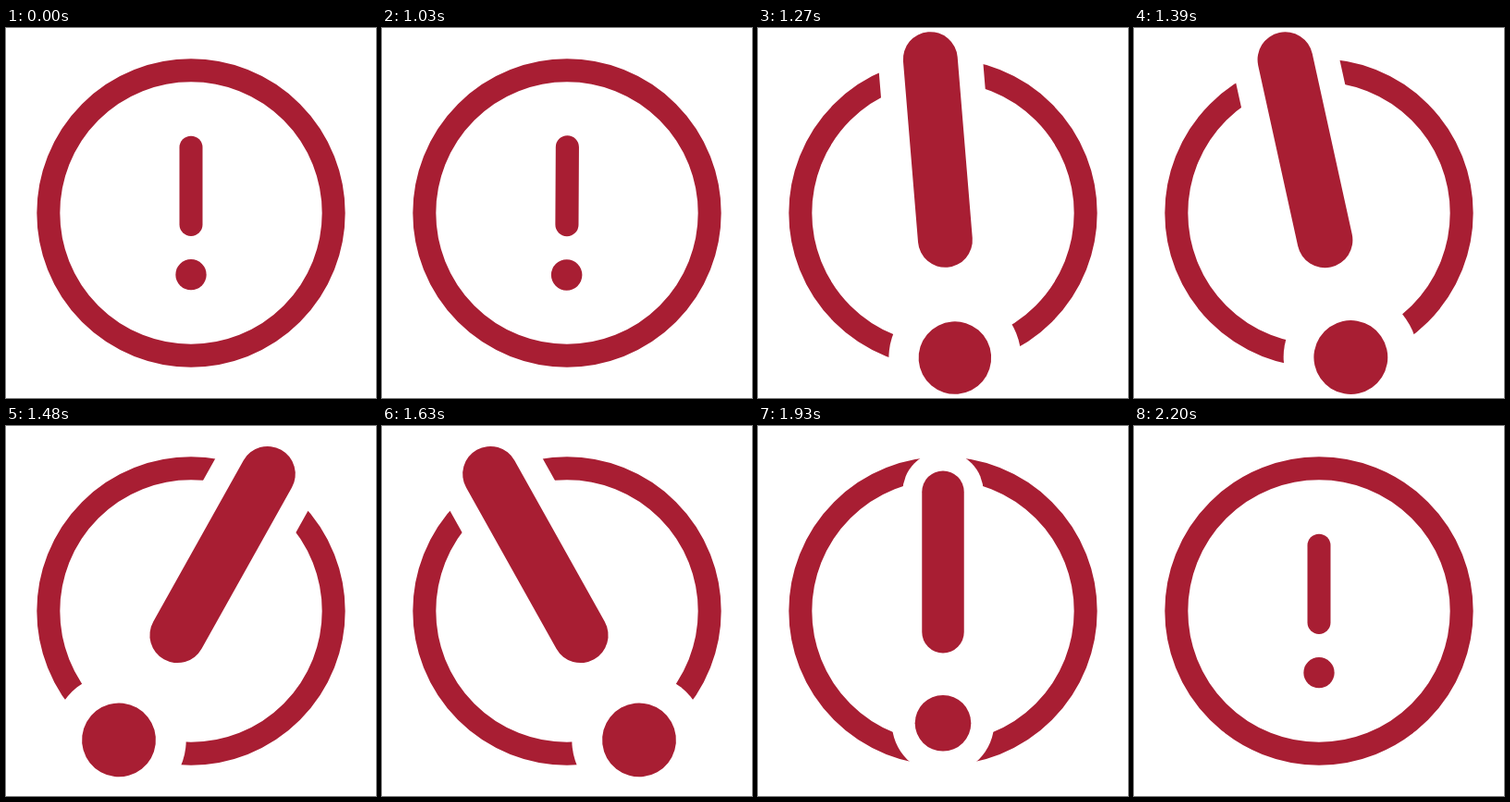
An HTML page that plays this animation: 400 by 400 pixels, repeating every 2230 ms.

```html
<!DOCTYPE html>
<html lang="en">
<head>
<meta charset="utf-8">
<title>Alert icon</title>
<style>
  html, body { margin: 0; height: 100%; overflow: hidden; background: #fff; }
  svg { display: block; width: 100%; height: 100%; }
  .line { fill: none; stroke: #a81e33; stroke-width: 1.5; stroke-linecap: round; }
  .dot { fill: #a81e33; }
  .gap.line { stroke: #fff; stroke-width: 2.88; }
  .gap.dot { fill: #fff; }
</style>
</head>
<body>
<svg viewBox="0 0 24 24">
  <circle class="line" cx="12" cy="12" r="9.25"/>
  <g id="mark">
    <path class="gap line" d="M12 7.75V12.75"/>
    <circle class="gap dot" cx="12" cy="16" r="1.82"/>
    <path class="line" d="M12 7.75V12.75"/>
    <circle class="dot" cx="12" cy="16" r="1"/>
  </g>
</svg>
<script>
  const LOOP = 2230, REST = 1030, STEP = 30;
  // [time in ms, value]
  const scaleKeys = [[1020, 1], [1298, 2.396], [1720, 2.396], [2195, 1]];
  const angleKeys = [[1020, 0], [1187, 29.5], [1337, -29.5], [1486, 29.5], [1636, -29.5], [1792, 0]];
  const mark = document.getElementById('mark');

  const ease = x => x * x * (3 - 2 * x);

  function valueAt(keys, t) {
    if (t <= keys[0][0]) return keys[0][1];
    const next = keys.findIndex(key => key[0] > t);
    if (next < 0) return keys[keys.length - 1][1];
    const [t0, v0] = keys[next - 1], [t1, v1] = keys[next];
    return v0 + (v1 - v0) * ease((t - t0) / (t1 - t0));
  }

  function draw() {
    let t = performance.now() % LOOP;
    t = t < REST ? 0 : REST + Math.floor((t - REST) / STEP) * STEP;
    const angle = valueAt(angleKeys, t), scale = valueAt(scaleKeys, t);
    mark.setAttribute('transform',
      `translate(12 12) rotate(${angle}) scale(${scale}) translate(-12 -12)`);
    requestAnimationFrame(draw);
  }
  draw();
</script>
</body>
</html>
```
